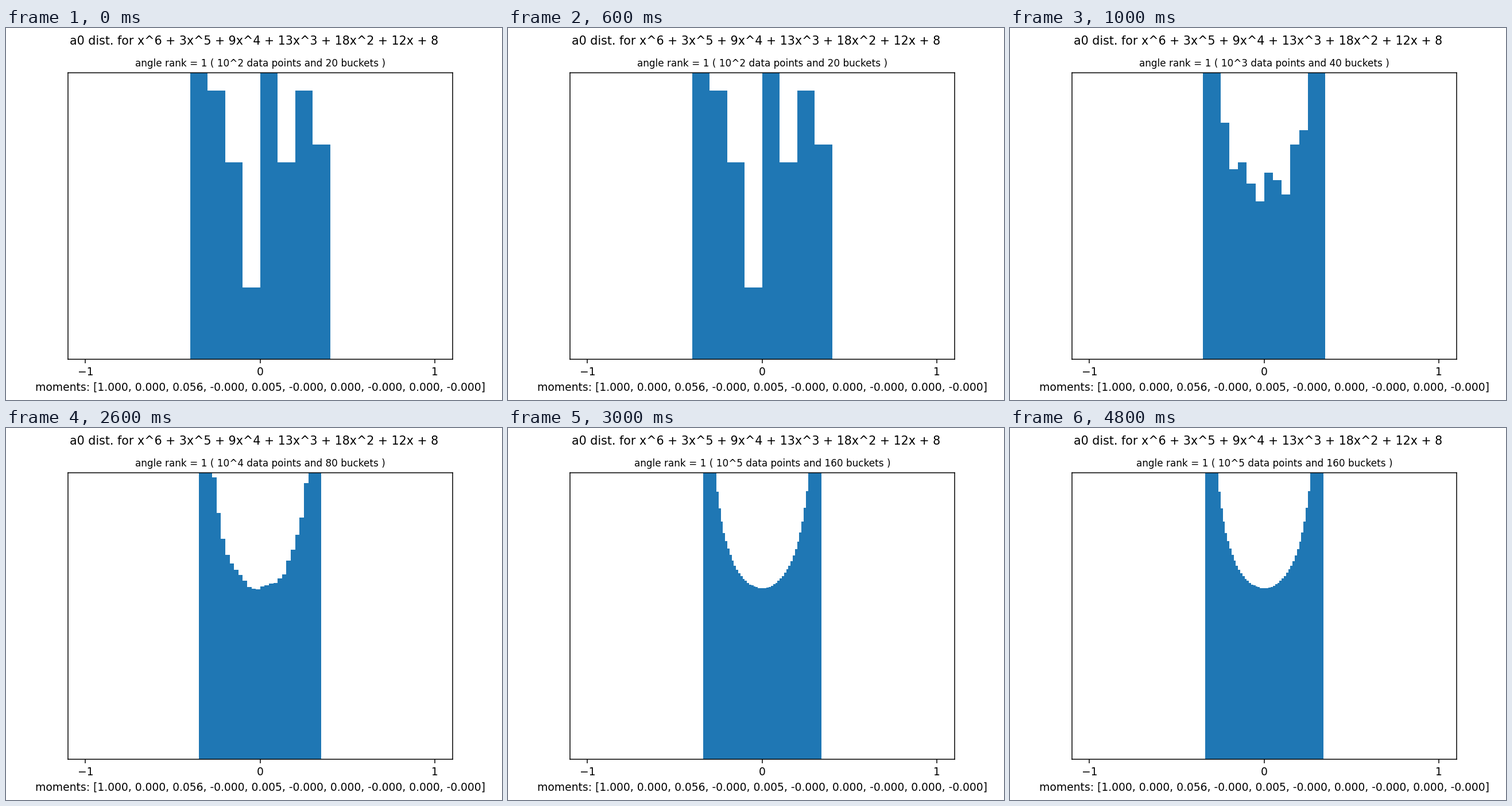
These frames come from a looping animation (864 px wide and 648 px high, 6 s). A matplotlib script:

```python
import matplotlib.pyplot as plt
import numpy as np
from matplotlib.animation import FuncAnimation

DPI = 135
STAGES = 4
LOOP_FRAMES = 6  # the last stage is held until the loop ends

plt.rcParams["font.family"] = "DejaVu Sans"

# The polynomial is (x^2 + x + 2)^3, so one angle drives every trace.
THETA = np.arccos(-1 / (2 * np.sqrt(2)))
POLYNOMIAL = "x^6 + 3x^5 + 9x^4 + 13x^3 + 18x^2 + 12x + 8"
MOMENTS = ("1.000, 0.000, 0.056, -0.000, 0.005, "
           "-0.000, 0.000, -0.000, 0.000, -0.000")

fig, ax = plt.subplots(figsize=(864 / DPI, 648 / DPI), dpi=DPI)
fig.suptitle(f"a0 dist. for {POLYNOMIAL}", fontsize=11)


def traces(count):
    return np.cos(np.arange(1, count + 1) * THETA) / 3


def draw(frame):
    stage = min(frame, STAGES - 1)
    exponent = stage + 2
    buckets = 20 * 2 ** stage

    ax.clear()
    ax.hist(traces(10 ** exponent), bins=buckets, range=(-1, 1),
            density=True, color="#1f77b4")
    ax.set_xlim(-1.1, 1.1)
    ax.set_ylim(0, 1.6)
    ax.set_xticks([-1, 0, 1])
    ax.set_yticks([])
    ax.set_title(f"angle rank = 1 ( 10^{exponent} data points "
                 f"and {buckets} buckets )", fontsize=9)
    ax.set_xlabel(f"moments: [{MOMENTS}]", fontsize=10)


animation = FuncAnimation(fig, draw, frames=LOOP_FRAMES, init_func=lambda: None,
                          interval=1000, repeat=True, repeat_delay=0)
plt.show()
```
